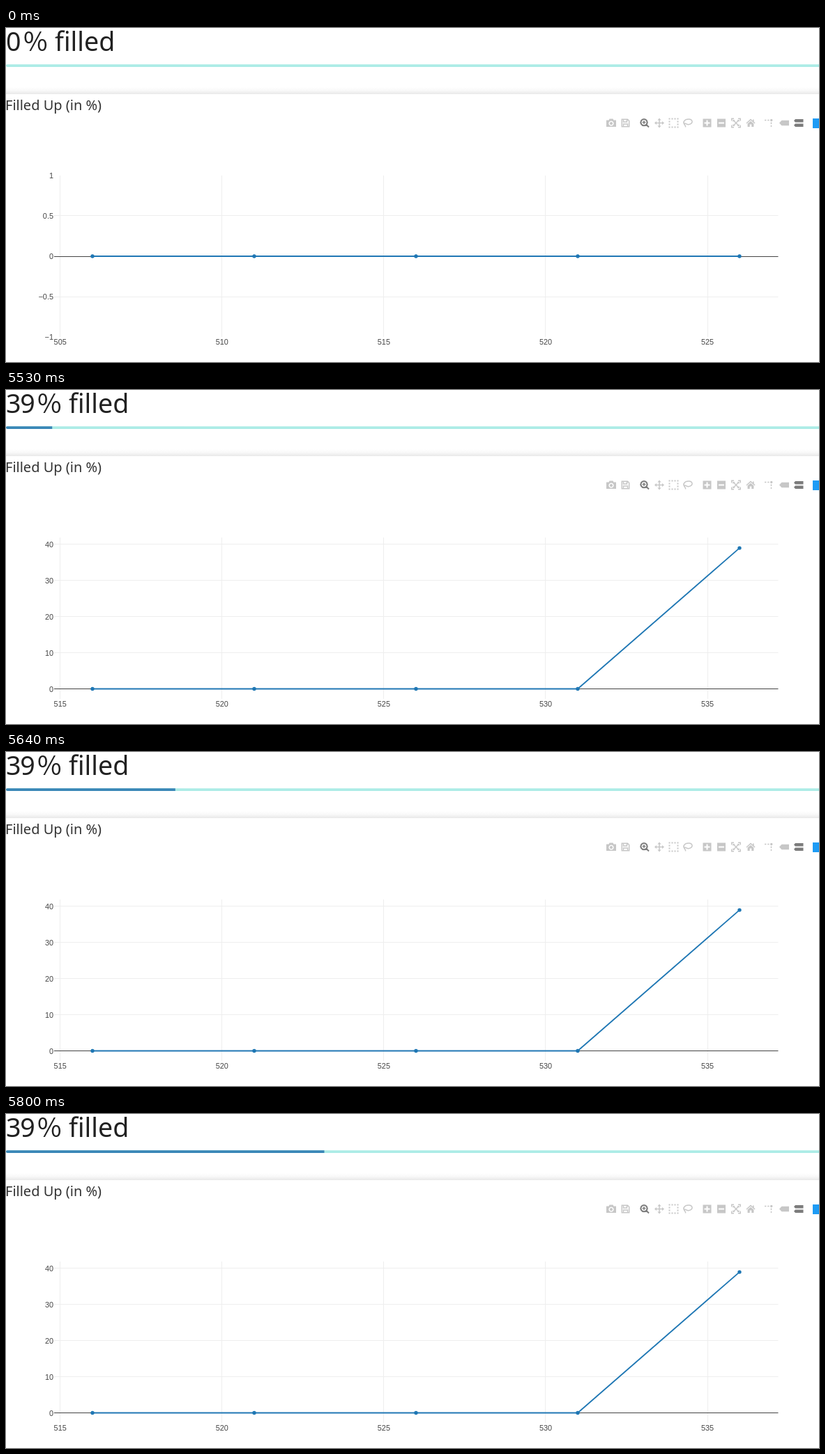
Animation, 1166 px wide and 480 px high, one loop 8 s. Source, as an HTML page:

```html
<!DOCTYPE html>
<html lang="en">
<head>
<meta charset="utf-8">
<title>Fill level</title>
<style>
  html, body { margin: 0; width: 100%; height: 100%; overflow: hidden; background: #fff; }
  svg { display: block; }
  .head { font: 37.6px "Noto Sans", sans-serif; fill: #212121; }
  .num { letter-spacing: -1.2px; }
  .pct { font-family: "Noto Sans CJK SC", "Noto Sans CJK JP", "Noto Sans", sans-serif; }
  .title { font: 300 20px "Noto Sans", sans-serif; fill: #333; }
  .axis { font: 10.9px "Liberation Sans", Arial, sans-serif; fill: #444; }
  .grid { stroke: #eee; fill: none; }
  .zero { stroke: #444; }
  .trace { stroke: #1f77b4; stroke-width: 1.8; fill: none; stroke-linejoin: round; }
  .dot { fill: #1f77b4; }
  .tools { fill: #c7c7c7; stroke: #c7c7c7; stroke-width: 0; }
  .tools .on { fill: #7c7c7c; stroke: #7c7c7c; }
  .tools .line { fill: none; stroke-width: 1.5; }
</style>
</head>
<body>
<svg width="1166" height="480" viewBox="0 0 1166 480">
  <defs>
    <linearGradient id="shade" x2="0" y2="1">
      <stop offset="0" stop-color="#fff"/>
      <stop offset=".5" stop-color="#f8f8f8"/>
      <stop offset="1" stop-color="#e8e8e8"/>
    </linearGradient>
  </defs>
  <text class="head num" id="num" x="0" y="32.5"></text>
  <g class="head" id="unit">
    <text class="pct" x="25" y="32.5">%</text>
    <text x="70" y="32.5">filled</text>
  </g>
  <rect y="52.3" width="1170" height="3.6" rx="1.8" fill="#acece6"/>
  <path id="bar" fill="#3a87b7"/>
  <rect y="85" width="1166" height="10" fill="url(#shade)"/>
  <text class="title" x="-1" y="118">Filled Up (in %)</text>

  <!-- Toolbar: each icon is drawn around its own centre -->
  <g class="tools">
    <path transform="translate(868 136.5)" fill-rule="evenodd"
      d="M-7-4h3.5l1-2h5l1 2H7v9.5H-7zM0-3a3.6 3.6 0 1 0 .01 0zM0-1.5a2.1 2.1 0 1 1-.01 0z"/>
    <path transform="translate(888.5 136.5)" class="line" stroke-width="1.2"
      d="M-5.2-5.2H3L5.2-3V5.2H-5.2zM-3-5V-1.5H2V-5M-3 5V1.5H3V5"/>
    <g transform="translate(916 136.5)" class="on">
      <path class="line" style="stroke-width:2" d="M-1-5.5a4.6 4.6 0 1 0 .01 0zM2.5 2.5L6 6"/>
      <path class="line" d="M-3.4-.9H1.4M-1-3.3V1.5"/>
    </g>
    <g transform="translate(937 136.5)">
      <path class="line" d="M-5 0H5M0-5V5"/>
      <path d="M-7 0l3-2.6v5.2zM7 0l-3-2.6v5.2zM0-7l-2.6 3h5.2zM0 7l-2.6-3h5.2z"/>
    </g>
    <path transform="translate(957.5 136.5)" class="line" style="stroke-width:2"
      stroke-dasharray="2 2" d="M-7-6H7M-7 6H7M-6-3V5M6-3V5"/>
    <path transform="translate(978 136.5)" class="line"
      d="M-4.5 2.3C-8-1-5-5.5 1-5.5C8-5.5 7.5 1.5 1 2.2C-2 2.6-3-.5-5 1.2C-6.2 3-2.5 3-3.5 6"/>
    <path transform="translate(1005.5 136.5)" fill-rule="evenodd"
      d="M-6-6H6V6H-6zM-1-4V-1H-4V1H-1V4H1V1H4V-1H1V-4z"/>
    <path transform="translate(1026 136.5)" fill-rule="evenodd" d="M-6-6H6V6H-6zM-4-1V1H4V-1z"/>
    <g transform="translate(1047 136.5)">
      <path class="line" d="M-6.2-3V-6.2H-3M3-6.2H6.2V-3M6.2 3V6.2H3M-3 6.2H-6.2V3M-4-4L4 4M4-4L-4 4"/>
      <path d="M-4.5-4.5h3l-3 3zM4.5-4.5v3l-3-3zM4.5 4.5h-3l3-3zM-4.5 4.5v-3l3 3z"/>
    </g>
    <path transform="translate(1068 136.5)"
      d="M0-6L3-3.3V-5H4.6V-1.9L6.5 0L5.6 1L0-4L-5.6 1L-6.5 0zM-4.4 1L0-2.8L4.4 1V5.5H1.3V2H-1.3V5.5H-4.4z"/>
    <g transform="translate(1094 136.5)">
      <path class="line" stroke-dasharray="2.4 1.8" d="M-6-4H1M3.5-1V6"/>
      <circle cx="3.7" cy="-4" r="1.7"/>
    </g>
    <path transform="translate(1116 136.5)" d="M-7 0L-3.5-3.7H7V3.7H-3.5z"/>
    <path transform="translate(1137 136.5)" class="on"
      d="M-7-3.2L-5-5.6H6.5V-.9H-5zM-7 3.2L-5 .9H6.5V5.6H-5z"/>
    <rect x="1157" y="130" width="14" height="14" fill="#1d9bf5"/>
  </g>

  <g id="chart"></g>
</svg>
<script>
const LOOP = 8000, STEP = 232.1;
const REFRESH = [5480, 5530, 5580, 5640, 5690, 5740, 5800];
const el = id => document.getElementById(id);

const flat = { zero: 328, unit: 116.2, ticks: [-1, -0.5, 0, 0.5, 1], last: 0 };
const risen = { zero: 429.5, unit: 5.19, ticks: [0, 10, 20, 30, 40], last: 39 };

function label(x, y, value, anchor) {
  const text = String(value).replace('-', '\u2212');
  return `<text class="axis" x="${x}" y="${y}" text-anchor="${anchor}">${text}</text>`;
}

function drawChart(first, { zero, unit, ticks, last }) {
  const yOf = v => zero - v * unit;
  let grid = '', labels = '', dots = '', points = '';
  for (let i = 0; i < 5; i++) {
    const gridX = Math.floor(77.6 + i * STEP) + 0.5;
    grid += `M${gridX} 212V444`;
    labels += label(77.7 + i * STEP, 455, first + 5 * i, 'middle');

    const x = 124 + i * 232, y = yOf(i === 4 ? last : 0);
    points += `${x},${y} `;
    dots += `<circle class="dot" cx="${x}" cy="${y}" r="2.7"/>`;
  }
  for (const v of ticks) {
    const y = yOf(v);
    if (v && Math.abs(v) !== 1) grid += `M69 ${Math.floor(y) + 0.5}H1107.5`;
    labels += label(68, y + 4, v, 'end');
  }
  const base = Math.floor(zero) + 0.5;
  el('chart').innerHTML = `<path class="grid" d="${grid}"/>` +
    `<path class="zero" d="M69 ${base}H1107.5"/>${labels}` +
    `<polyline class="trace" points="${points}"/>${dots}`;
}

function drawBar(t) {
  const seen = REFRESH.filter(r => r <= t).pop() || 0;
  const w = Math.max(0, Math.min(456.5, 146.5 + 1.605 * (seen - 5580)));
  el('bar').setAttribute('d', w ? `M1.8 52.3H${w}V55.9H1.8A1.8 1.8 0 0 1 1.8 52.3` : '');
}

let shown;
function frame() {
  const t = performance.now() % LOOP;
  const first = t < 500 ? 505 : t < 5480 ? 510 : 515;
  if (first !== shown) {
    shown = first;
    const state = first === 515 ? risen : flat;
    const num = String(state.last);
    el('num').textContent = num;
    el('unit').setAttribute('transform', `translate(${20 * (num.length - 1)} 0)`);
    drawChart(first, state);
  }
  drawBar(t);
  requestAnimationFrame(frame);
}
frame();
</script>
</body>
</html>
```
